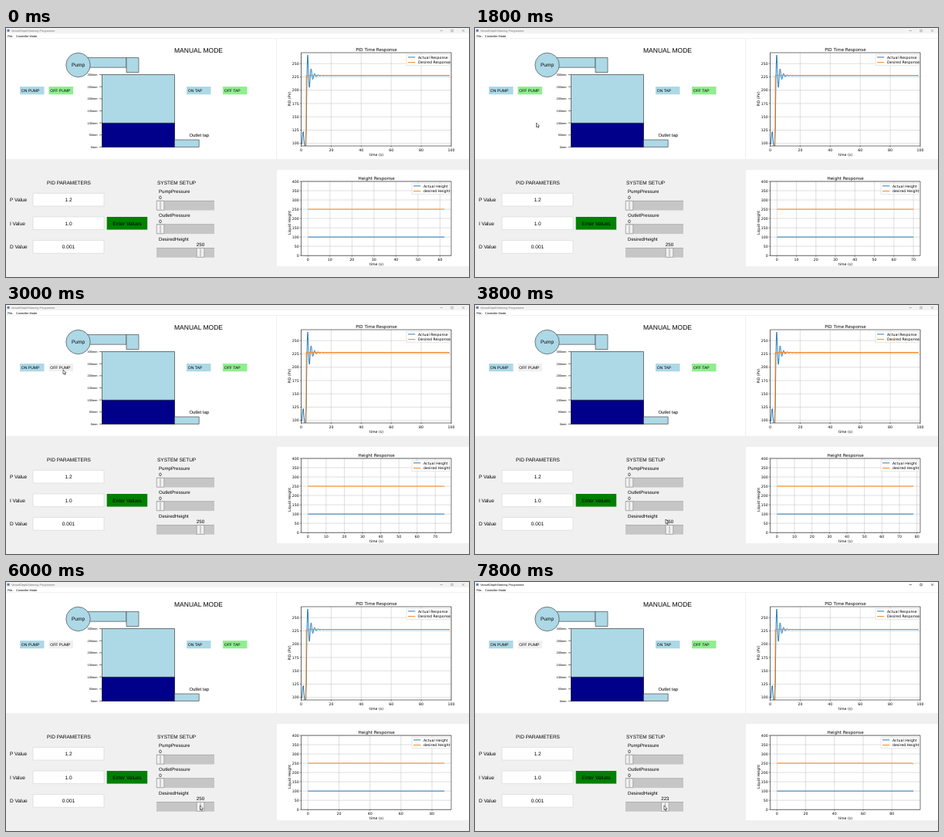
An HTML page with a canvas that plays this animation: 600x323 px, repeating every 8 s.

```html
<!DOCTYPE html>
<html lang="en">
<head>
<meta charset="utf-8">
<title>Tank panel</title>
<style>
html, body { margin: 0; width: 100%; height: 100%; overflow: hidden; background: #f0f0f0; }
canvas { display: block; width: 600px; height: 323px; }
</style>
</head>
<body>
<canvas id="stage"></canvas>
<script>
const W = 600, H = 323, LOOP = 8000, STEP = 200;
const UI = '"Liberation Sans", Arial, sans-serif';
const PLOT = '"DejaVu Sans", sans-serif';
const BLUE = '#1f77b4', ORANGE = '#ff7f0e', LIGHT = '#add8e6', GREEN = '#90ee90';

const canvas = document.getElementById('stage');
const ctx = canvas.getContext('2d');
const ratio = window.devicePixelRatio || 1;
canvas.width = W * ratio;
canvas.height = H * ratio;
ctx.scale(ratio, ratio);
if ('textRendering' in ctx) ctx.textRendering = 'geometricPrecision';

function rect(x, y, w, h, fill, stroke, width = 0.6) {
  if (fill) { ctx.fillStyle = fill; ctx.fillRect(x, y, w, h); }
  if (stroke) { ctx.strokeStyle = stroke; ctx.lineWidth = width; ctx.strokeRect(x, y, w, h); }
}

function line(points, color, width) {
  ctx.beginPath();
  points.forEach(([x, y]) => ctx.lineTo(x, y));
  ctx.strokeStyle = color;
  ctx.lineWidth = width;
  ctx.lineJoin = 'round';
  ctx.stroke();
}

function text(str, x, y, size, align = 'left', font = UI, color = '#000') {
  ctx.font = `${size}px ${font}`;
  ctx.textAlign = align;
  ctx.textBaseline = 'alphabetic';
  ctx.fillStyle = color;
  ctx.fillText(str, x, y + size * 0.36);
}

const label = (str, x, y, size = 4.7, align = 'center') => text(str, x, y, size, align, PLOT);

// Linear interpolation through [time, ...values] keys.
function track(keys, t) {
  const i = keys.findIndex(k => k[0] > t);
  if (i === 0) return keys[0].slice(1);
  if (i < 0) return keys[keys.length - 1].slice(1);
  const a = keys[i - 1], b = keys[i], u = (t - a[0]) / (b[0] - a[0]);
  return a.slice(1).map((v, n) => v + (b[n + 1] - v) * u);
}

function titleBar(active) {
  rect(0, 0, W, 7, active ? '#fff' : '#f3f3f3');
  rect(0, 7, W, 6.5, '#fff');
  rect(0, 13.2, W, 0.8, '#f0f0f0');
  rect(1.5, 1.8, 3, 3, '#5577a5');
  const ink = active ? '#111' : '#777';
  text('VesselDepthSteering Programme', 7, 3.7, 3.8, 'left', UI, ink);
  text('File..', 2, 10.3, 3.8);
  text('Controller Mode', 13, 10.3, 3.8);
  line([[562.5, 3.5], [566, 3.5]], ink, 0.5);
  rect(576.8, 2.3, 2.5, 2.5, null, ink, 0.5);
  line([[591, 2], [594, 5]], ink, 0.5);
  line([[594, 2], [591, 5]], ink, 0.5);
}

function button(str, x, fill) {
  rect(x, 76, 31.5, 10.2, fill);
  text(str, x + 1.7, 81.2, 5.1);
}

function tank(pumpOff) {
  text('MANUAL MODE', 218, 29.2, 8.5);
  rect(105, 38.5, 51, 12.7, LIGHT, '#333');
  rect(156, 38.5, 16, 19, LIGHT, '#333');
  ctx.beginPath();
  ctx.arc(93.5, 48, 15.7, 0, Math.PI * 2);
  ctx.fillStyle = LIGHT;
  ctx.fill();
  ctx.strokeStyle = '#333';
  ctx.lineWidth = 0.6;
  ctx.stroke();
  text('Pump', 93.5, 48, 6.5, 'center');

  rect(124.5, 60.5, 94, 94, LIGHT, '#222');
  rect(124.5, 123.3, 94, 31.2, '#00008b', '#222');
  rect(218.5, 145, 31.7, 9.4, LIGHT, '#333');
  text('Outlet tap', 237.5, 138.8, 5.9);
  for (let mm = 0; mm <= 300; mm += 50) {
    const y = 154.4 - mm * 0.313;
    text(mm + 'mm', 118.5, y, 3.9, 'right');
    line([[121, y], [124.5, y]], '#222', 0.6);
  }
  button('ON PUMP', 18, LIGHT);
  button('OFF PUMP', 55.5, pumpOff ? '#f0f0f0' : GREEN);
  button('ON TAP', 234, LIGHT);
  button('OFF TAP', 281, GREEN);
}

function slider(name, value, y) {
  const x = 200 + value * 0.208;
  text(name, 198, y, 6.1);
  text(String(Math.round(value)), x, y + 7.4, 6.2, 'center');
  rect(195, y + 11.6, 75, 12.6, '#c6c6c6');
  rect(195, y + 11.6, 75, 0.6, '#a0a0a0');
  rect(x - 4.8, y + 12, 9.6, 11.8, '#f0f0f0', '#888', 0.6);
  line([[x, y + 13], [x, y + 23]], '#888', 0.7);
}

function settings(desired) {
  text('PID PARAMETERS', 53, 201, 6.5);
  text('SYSTEM SETUP', 196, 201, 6.5);
  [['P Value', '1.2'], ['I Value', '1.0'], ['D Value', '0.001']].forEach(([name, value], i) => {
    const y = 222.7 + i * 30.6;
    text(name, 5, y, 6.5);
    rect(35, y - 8.3, 92, 16.6, '#fff', '#d4d4d4', 0.6);
    text(value, 81, y, 6.5, 'center');
  });
  rect(130.7, 245, 52.5, 16.6, '#008000');
  text('Enter Values', 157, 253.3, 6.6, 'center');
  slider('PumpPressure', 0, 212.3);
  slider('OutletPressure', 0, 242.9);
  slider('DesiredHeight', desired, 273.5);
}

const LEFT = 382.5, RIGHT = 577;

function axes(o) {
  for (const [v, x] of o.xTicks) {
    line([[x, o.top], [x, o.bottom]], '#b8b8b8', 0.45);
    line([[x, o.bottom], [x, o.bottom + 1.4]], '#000', 0.5);
    label(String(v), x, o.bottom + 5.2);
  }
  for (const [v, y] of o.yTicks) {
    line([[LEFT, y], [RIGHT, y]], '#b8b8b8', 0.45);
    line([[LEFT - 1.4, y], [LEFT, y]], '#000', 0.5);
    label(String(v), LEFT - 2.8, y, 4.7, 'right');
  }
  ctx.save();
  ctx.beginPath();
  ctx.rect(LEFT, o.top, RIGHT - LEFT, o.bottom - o.top);
  ctx.clip();
  line(o.actual, BLUE, 0.95);
  line(o.desired, ORANGE, 0.95);
  ctx.restore();
  rect(LEFT, o.top, RIGHT - LEFT, o.bottom - o.top, null, '#000', 0.55);

  label(o.title, 480, o.top - 4.2, 5.6);
  label('time (s)', 480, o.timeY);
  ctx.save();
  ctx.translate(367, o.nameY);
  ctx.rotate(-Math.PI / 2);
  label(o.name, 0, 0);
  ctx.restore();

  rect(o.legendX, o.top + 2.3, 574.7 - o.legendX, 14.4, 'rgba(255,255,255,.85)', '#ccc', 0.5);
  o.legend.forEach((str, i) => {
    const y = o.top + 5.9 + i * 6.7;
    line([[o.legendX + 2, y], [o.legendX + 11.3, y]], i ? ORANGE : BLUE, 0.95);
    label(str, o.legendX + 15, y, 4.7, 'left');
  });
}

function pidChart() {
  const xAt = v => LEFT + v * 1.945;
  const yAt = v => 149.7 - (v - 100) * 0.69;
  const actual = [[382.7, 151], [383.6, 150], [384.8, 135], [385.4, 134.5], [386.4, 148],
    [387.2, 153], [388, 153.5], [388.7, 140]];
  // Damped ringing around the set point.
  for (let x = 389.2; x <= 575; x += 0.2) {
    const u = x - 391;
    const ring = u < 0 ? 26.5 - u * u * 30 : 26.5 * Math.exp(-u / 4) * Math.cos(u * 1.4);
    actual.push([x, 61.7 - ring]);
  }
  axes({
    title: 'PID Time Response', name: 'PID (PV)', nameY: 92, timeY: 164.4,
    top: 32, bottom: 153,
    xTicks: [0, 20, 40, 60, 80, 100].map(v => [v, xAt(v)]),
    yTicks: [100, 125, 150, 175, 200, 225, 250].map(v => [v, yAt(v)]),
    actual, desired: [[388.8, 154], [389.2, 61.5], [575, 61.5]],
    legendX: 519, legend: ['Actual Response', 'Desired Response']
  });
}

function heightChart(end, dip) {
  const x0 = 391.3, scale = 176.8 / end;
  const xAt = v => x0 + v * scale;
  const yAt = v => 295.2 - v * 0.2405;
  const gap = end * 1.1 / 9 > 10 ? 20 : 10;
  const xTicks = [], yTicks = [];
  for (let v = 0; v <= end * 1.05; v += gap) xTicks.push([v, xAt(v)]);
  for (let v = 0; v <= 400; v += 50) yTicks.push([v, yAt(v)]);
  axes({
    title: 'Height Response', name: 'Liquid Height', nameY: 252.5, timeY: 306.5 + 0.3,
    top: 199, bottom: 295.2 + 0.2405 * 0, xTicks, yTicks,
    ...heightFrame,
    actual: [[xAt(0), yAt(100)], [xAt(end), yAt(100)]],
    desired: [[xAt(0), yAt(250)], [xAt(end - 1), yAt(250)], [xAt(end), yAt(250 - dip)]],
    legendX: 526, legend: ['Actual Height', 'desired Height']
  });
}
const heightFrame = { bottom: 295.3 };

function cursor(x, y) {
  const shape = [[0, 0], [0, 5.6], [1.3, 4.5], [2.2, 6.5], [3.1, 6.1], [2.3, 4.2], [4, 4.1]];
  ctx.beginPath();
  shape.forEach(([dx, dy]) => ctx.lineTo(x + dx, y + dy));
  ctx.closePath();
  ctx.fillStyle = '#fff';
  ctx.fill();
  ctx.strokeStyle = '#111';
  ctx.lineWidth = 0.6;
  ctx.stroke();
}

const POINTER = [[1400, 62, 104], [1800, 79.5, 123], [2200, 80, 112], [2600, 75, 87],
  [3000, 74, 84], [3200, 76, 88], [3600, 238, 268], [3800, 247, 278], [4400, 245, 277],
  [5000, 243, 276], [5600, 250, 286], [6000, 251.5, 290], [7200, 251.5, 290],
  [7400, 250, 290], [7600, 248, 290], [7800, 245, 290]];
const DESIRED = [[7200, 250], [7400, 246], [7600, 237], [7800, 223]];

function draw(t) {
  rect(0, 0, W, H, '#f0f0f0');
  rect(0, 14, 350, 156, '#fff');
  rect(351, 14, 249, 156, '#fff');
  rect(351, 184, 249, 125, '#fff');
  titleBar(t >= 6600);
  tank(t >= 2600);
  settings(track(DESIRED, t)[0]);
  pidChart();
  heightChart(Math.round(62 + t * 0.00425), t >= 7600 ? 5 : 0);
  if (t >= 1400) cursor(...track(POINTER, t));
}

function loop() {
  const t = performance.now() % LOOP;
  draw(Math.floor(t / STEP) * STEP);
  requestAnimationFrame(loop);
}
loop();
</script>
</body>
</html>
```
